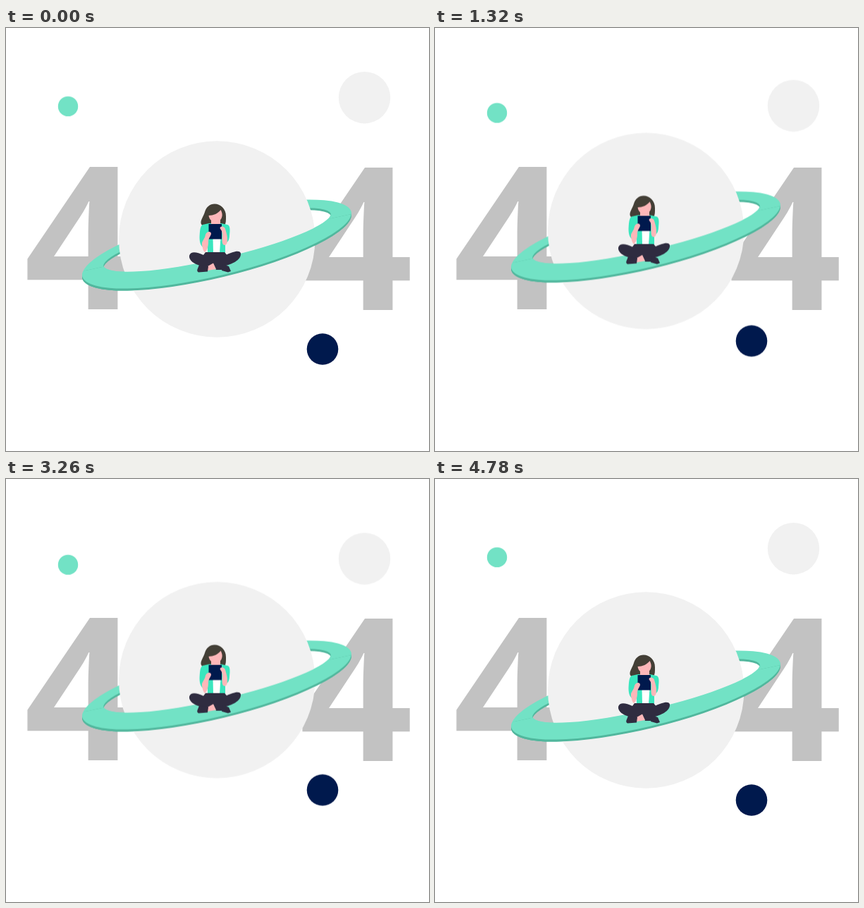
An HTML page for the animation above (4.8 s loop, 600 px wide and 600 px high).

```html
<!DOCTYPE html>
<html lang="en">
<head>
<meta charset="utf-8">
<title>404</title>
<style>
  html, body { margin: 0; width: 100%; height: 100%; overflow: hidden; background: #fff; }
  svg { display: block; width: 100%; height: 100%; }
  text { font: 700 283px "Open Sans", "Noto Sans", sans-serif; fill: #c2c2c2; text-rendering: geometricPrecision; }
  .rise, .sink, .drift { animation: 4.8s cubic-bezier(.37, 0, .63, 1) infinite; }
  .rise { animation-name: rise; }
  .sink { animation-name: sink; }
  .drift { animation-name: drift; animation-delay: -.2s; }
  @keyframes rise { 50% { transform: translateY(-20px); } }
  @keyframes sink { 50% { transform: translateY(20px); } }
  @keyframes drift { 55.2% { transform: translateY(15.5px); } }
  .mint { fill: #72e2c5; }
  .edge { fill: #51b79d; }
  .pale { fill: #f1f1f1; }
  .navy { fill: #00194d; }
  .skin { fill: #fdb7b9; }
  .coat { fill: #3ae6be; }
  .hair { fill: #433f36; }
  .dark { fill: #2f2c40; }
</style>
</head>
<body>
<svg viewBox="0 0 600 600">
  <defs>
    <path id="band" fill-rule="evenodd" d="M108.3 352.6A196.2 44.8 -13.6 0 1 489.7 260.4A196.2 44.8 -13.6 0 1 108.3 352.6Z
      M138.2 337.7A165.6 27.6 -13 0 1 460.8 263.3A165.6 27.6 -13 0 1 138.2 337.7Z"/>
    <g id="ring">
      <use href="#band" class="edge" y="3"/>
      <use href="#band" class="mint"/>
    </g>
    <clipPath id="front"><path d="M0 368L600 240.5V600H0Z"/></clipPath>
  </defs>

  <text x="25.6" y="399">4</text>
  <text x="415.6" y="400">4</text>

  <circle class="pale sink" cx="508.5" cy="98.7" r="36.7"/>
  <circle class="mint drift" cx="88" cy="110.9" r="14.2"/>

  <g class="rise">
    <circle class="navy" cx="449" cy="455.5" r="22.3"/>
    <use href="#ring"/>
    <circle class="pale" cx="299.2" cy="299.5" r="139.2"/>
    <g clip-path="url(#front)"><use href="#ring"/></g>

    <g id="reader">
      <path class="hair" d="M296 249.5C304 249.5 312 256 312 267C312 273 312 277 310 280L283 281C279 281 276 279 276.500 275C277 271 280 267 282 261C284 254 289 249.500 296 249.500Z"/>
      <path class="coat" d="M288 277L279 279C275 281 275 289 274.500 297C274.500 305 277 310 280 311L286 302V319H311V305C315 304 317 300 317 294C318 286 318 280 314 279L305 277Z"/>
      <path fill="#fff" d="M293.500 297H304.500L303 319H294Z"/>
      <path class="skin" d="M291 270H304V279H291Z"/>
      <path class="skin" d="M287.500 266C294 266 301 263 304.500 258C307 262 307.500 267 305 271C302 276 294 276 291 273C289 271 288 269 287.500 266Z"/>
      <path class="dark" d="M283 318H310L313 321.500C321 318 331 314 333 319.500C334 328 323 334 312 337L306 343L298 343L294 334L286 339L275 337C268 335 259 330 260 323C262 316 271 318 280 322Z"/>
      <path class="skin" d="M286 338L294 333.500L298 342L286 344Z"/>
      <path class="dark" d="M274 336L287 338L286 345.500L273 346.500Q270 345 272 341Z"/>
      <path class="dark" d="M307 335L316 338L319 345L315 346.500L306 344Z"/>
      <path class="navy" d="M287.500 278H306V299.500H287.500Z"/>
      <path class="skin" d="M278 308C277 302 282 300 283 293C285 288 291 288 291 292C290 296 287 298 287 303C287 310 285 316 282 318C280 317 279 312 278 308Z"/>
      <path class="skin" d="M303.500 284C304 280 310 281 311 285C313 292 315 298 313.500 305C312 309 308 309 307 305C306 299 308 293 306 288Z"/>
    </g>
  </g>
</svg>
</body>
</html>
```
